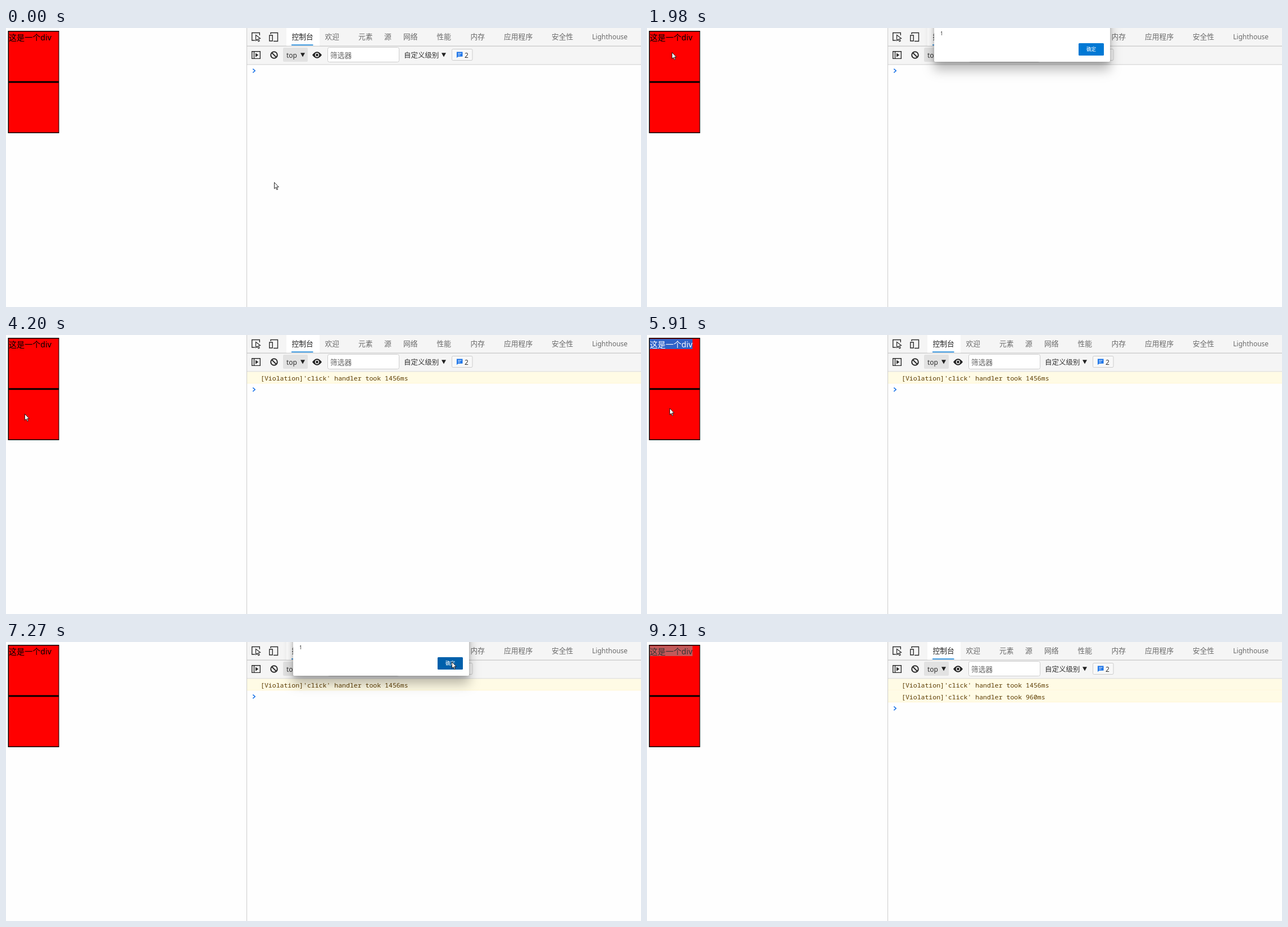
Write an HTML page that moves like this. It is 1130 px wide and 496 px high and loops after 9.31 s.

```html
<!DOCTYPE html>
<html lang="zh-CN">
<meta charset="utf-8">
<style>
  html, body { margin: 0; height: 100%; overflow: hidden; background: #fefefe; }
  svg { display: block; font: 12.8px "Noto Sans", "Noto Sans CJK SC", "Noto Sans CJK", sans-serif; fill: #333; }
  text { white-space: pre; }
  .tabs { fill: #6a6a6a; }
  .latin { font-size: 12px; }
  .line { fill: none; stroke: #2b2b2b; stroke-width: 1.4; }
  .field { fill: #fff; stroke: #ccc; }
  .log { font: 11.53px "Noto Sans Mono", "DejaVu Sans Mono", monospace; fill: #5c3c00; }
  .sheet { fill: #fff; filter: drop-shadow(0 2px 3px #0003) drop-shadow(0 14px 10px #0004); }
</style>
<svg width="1130" height="496" viewBox="0 0 1130 496">
  <path d="M3.5 5h91v182h-91z" fill="#000"/>
  <path d="M5 6.5h88.5v88H5zM5 97.5h88.5v88H5z" fill="#f00"/>
  <rect id="selection" x="5" y="7" width="76" height="18"/>
  <text id="label" x="5" y="21.5" font-size="14.1">这是一个div</text>

  <path d="M428 0h702v65H428z" fill="#f5f5f5"/>
  <path d="M428 31.5h702v1.5H428zM428 64.5h702v1H428z" fill="#d0d0d0"/>
  <path d="M428 0h1v496h-1z" fill="#cbcbcb"/>
  <path d="M499 0h59v31.5h-59z" fill="#fff"/>
  <path d="M508 29.5h38.5v1.5H508z" fill="#0078d4"/>
  <g class="line">
    <path d="M443 22h-5.3V8.5h13.6V13M468.8 13v10h5.4V13zM471 11V8.5h12.5v15H476"/>
    <path d="M437.7 41.8h14.6v12.6h-14.6zM441.5 42v12"/>
    <circle cx="477" cy="48" r="5.8" stroke-width="2"/>
    <path d="M473 44l8 8" stroke-width="2"/>
  </g>
  <path d="M444.5 12.5v10l2.6-2.2 2.1 3.7 1.9-1-2-3.6 3.4-1z" fill="#f5f5f5" stroke="#2b2b2b" stroke-width="1.2"/>
  <path d="M444 44.5v7.2l5.3-3.6z"/>
  <g class="tabs" id="tabs"></g>
  <rect x="493" y="35" width="44" height="25" rx="2" fill="#e2e2e2"/>
  <text class="latin" x="499" y="52.5">top</text>
  <path d="M524 44.3h8l-4 7.2zM775 44.3h8l-4 7.2z" fill="#222"/>
  <path d="M545 48q8.5-11.5 17 0q-8.5 11.5-17 0z" fill="#222"/>
  <circle cx="553.5" cy="48" r="3" fill="#222" stroke="#f5f5f5" stroke-width="1.4"/>
  <rect class="field" x="572.5" y="34.5" width="127" height="26" rx="3"/>
  <text x="577" y="53" fill="#666">筛选器</text>
  <text x="708" y="52.5" font-size="12.5">自定义级别</text>
  <rect class="field" x="793.5" y="37.5" width="36.5" height="20" rx="2" style="fill:#f8f8f8"/>
  <path d="M802 42.5h10.5v8.3H804.5L802 53.3z" fill="#1a73e8"/>
  <path d="M804 45.3h6.5M804 48h4.5" stroke="#fff"/>
  <text class="latin" x="816" y="52.5">2</text>

  <g class="log" id="log"></g>
  <path id="prompt" d="M439.3 72.7l3.8 3.3-3.8 3.3" fill="none" stroke="#1a73e8" stroke-width="1.6"/>

  <g id="dialog">
    <rect class="sheet" x="511" y="-30" width="313" height="90" rx="2"/>
    <text x="522" y="13" font-size="8.5">1</text>
    <rect id="button" x="768" y="27" width="45" height="22" rx="1.5"/>
    <text x="782" y="41" font-size="8.6" font-weight="500" fill="#fff">确定</text>
  </g>
  <path id="cursor" d="M.5.5v11.2l2.6-2.4 1.8 4.2 1.7-.7-1.8-4.1h3.5z" fill="#fff" stroke="#111" stroke-width=".9"/>
</svg>
<script>
const LOOP = 9310;
const get = id => document.getElementById(id);
const show = (el, on) => el.setAttribute('visibility', on ? 'visible' : 'hidden');
const within = (t, a, b) => t >= a && t < b;

const tabs = [['控制台', 508.5], ['欢迎', 567.5], ['元素', 627], ['源', 673], ['网络', 707], ['性能', 766.5],
  ['内存', 826.5], ['应用程序', 886], ['安全性', 971], ['Lighthouse', 1043]];
get('tabs').innerHTML = tabs.map(([name, x], i) =>
  `<text x="${x}" y="20"${i ? '' : ' fill="#222"'}${name > 'z' ? '' : ' class="latin"'}>${name}</text>`).join('');

// Each log row appears when its dialog is closed.
const closed = [3300, 7420];
get('log').innerHTML = [1456, 960].map((ms, i) => `<g transform="translate(0 ${21 * i})">
  <path d="M429 65.5h701V86H429z" fill="#fffbe5"/><path d="M429 85.5h701v.8H429z" fill="#fff3cc"/>
  <text x="453" y="80.5">[Violation]'click' handler took ${ms}ms</text></g>`).join('');
const rows = [...get('log').children];

// Cursor legs: first step, last step, number of steps, target x, y.
const legs = [
  [120, 120, 1, 475, 273], [710, 1400, 6, 44, 43], [2130, 2760, 6, 779, 37],
  [3450, 3690, 3, 110, 166], [3810, 3930, 2, 42, 149], [4080, 4200, 2, 33, 140],
  [5910, 5910, 1, 40, 130], [6050, 6180, 2, 49, 61], [6730, 7270, 5, 793, 35],
  [7570, 7840, 3, 37, 150], [8390, 8930, 5, 1080, 500]
];
const ease = p => p * p * (3 - 2 * p);

function cursorAt(t) {
  let x = 477, y = 274;
  for (const [start, end, steps, toX, toY] of legs) {
    if (t < start) break;
    const step = t >= end ? steps : 1 + Math.floor((t - start) / (end - start) * (steps - 1));
    const p = ease(step / steps);
    x += (toX - x) * p;
    y += (toY - y) * p;
  }
  return [Math.round(x), Math.round(y)];
}

function draw(t) {
  const [x, y] = cursorAt(t);
  get('cursor').setAttribute('transform', `translate(${x} ${y})`);

  const blurred = t >= 9210;
  const selected = within(t, 4790, 6460) || t >= 8120;
  show(get('selection'), selected);
  get('selection').setAttribute('fill', blurred ? '#c25a5a' : '#2f62c8');
  get('label').setAttribute('fill', blurred ? '#333' : selected ? '#fff' : '#000');

  show(get('dialog'), within(t, 1830, closed[0]) || within(t, 6460, closed[1]));
  const hover = within(x, 768, 813) && within(y, 27, 49);
  get('button').setAttribute('fill', hover ? '#0060ab' : '#0078d4');

  rows.forEach((row, i) => show(row, t >= closed[i]));
  const count = closed.filter(c => t >= c).length;
  get('prompt').setAttribute('transform', `translate(0 ${21 * count})`);
}

(function frame() {
  draw(performance.now() % LOOP);
  requestAnimationFrame(frame);
})();
</script>
</html>
```
